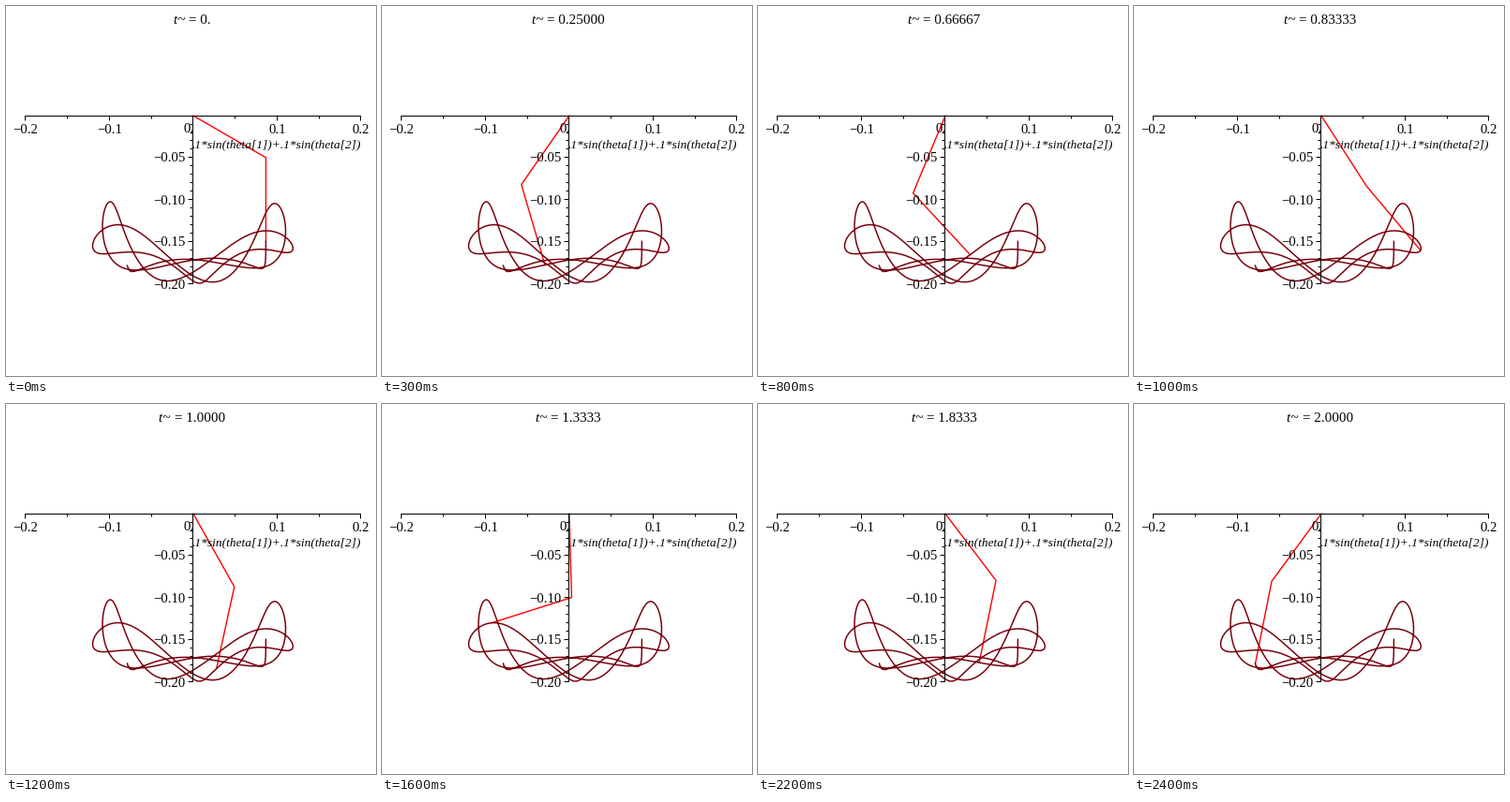
A matplotlib script for the animation above (2.5 s loop, 395 by 395 pixels).

```python
import numpy as np
import matplotlib.pyplot as plt
from matplotlib.animation import FuncAnimation

SIZE, DPI = 395, 79
PX = 72 / DPI                      # one pixel in points
X0, Y0, SCALE = 199.9, 117.1, 895  # pivot and pixels per metre
L, G = 0.1, 9.81
FRAMES, T_END, SUB = 25, 2.0, 100
LABEL_PX, TITLE_PX = 14.8, 15.1

plt.rcParams["font.family"] = "Liberation Serif"


def accel(s):
    """Double pendulum with equal masses and equal rods."""
    a1, a2, w1, w2 = s
    c, d = np.cos(a1 - a2), np.sin(a1 - a2)
    p = -2 * G / L * np.sin(a1) - d * w2**2
    q = -G / L * np.sin(a2) + d * w1**2
    b1 = (p - c * q) / (2 - c * c)
    return np.array([w1, w2, b1, q - c * b1])


def solve():
    h = T_END / ((FRAMES - 1) * SUB)
    s = np.array([np.pi / 3, 0.0, 0.0, 0.0])
    out = [s]
    for _ in range((FRAMES - 1) * SUB):
        k1 = accel(s)
        k2 = accel(s + h / 2 * k1)
        k3 = accel(s + h / 2 * k2)
        k4 = accel(s + h * k3)
        s = s + h / 6 * (k1 + 2 * k2 + 2 * k3 + k4)
        out.append(s)
    return np.array(out)


def to_px(x, y):
    return X0 + SCALE * x, Y0 - SCALE * y


def crisp(v):
    return np.floor(v) + 0.5


path = solve()
jx, jy = L * np.sin(path[:, 0]), -L * np.cos(path[:, 0])
tx, ty = jx + L * np.sin(path[:, 1]), jy - L * np.cos(path[:, 1])

fig = plt.figure(figsize=(SIZE / DPI, SIZE / DPI), dpi=DPI, facecolor="white")
ax = fig.add_axes([0, 0, 1, 1])
ax.set(xlim=(0, SIZE), ylim=(SIZE, 0))
ax.axis("off")


def line(xs, ys, color="black", width=1.0, z=3, **kw):
    return ax.plot(xs, ys, color=color, lw=width * PX, zorder=z, **kw)[0]


def label(x, y, s, size=LABEL_PX, **kw):
    return ax.text(x, y, s, fontsize=size * PX, va="baseline", zorder=5, **kw)


def draw_axes():
    ox, oy = crisp(X0), crisp(Y0)
    flat = dict(snap=False, solid_capstyle="butt")
    line([20, 379], [oy, oy], **flat)
    line([ox, ox], [117, 297], **flat)
    for i in range(-4, 5):
        x = crisp(X0 + SCALE * 0.05 * i)
        line([x, x], [oy, oy + (3 if i % 2 else 5)], **flat)
        if i % 2 == 0 and i:
            s = f"{0.05 * i:.1f}".replace("-", "\u2212")
            label(x + 0.5, 136, s, ha="center")
    label(195.3, 135, "0.", ha="center")
    for i in range(1, 21):
        y = crisp(Y0 + SCALE * 0.01 * i)
        line([ox - (3 if i % 5 else 5), ox], [y, y], **flat)
        if i % 5 == 0:
            label(191.5, y + 5, f"\u2212{0.01 * i:.2f}", ha="right")
    label(379.3, 151, ".1*sin(theta[1])+.1*sin(theta[2])", 13.35,
          ha="right", style="italic")


draw_axes()
rods = line([], [], "#ff0000", 1.4, 1, solid_joinstyle="round")
line(*to_px(tx, ty), "#78000e", 1.5, 2)
name = label(198, 19, "t~ ", TITLE_PX, ha="left", style="italic")
value = label(198, 19, "", TITLE_PX, ha="left")


def update(k):
    i = k * SUB
    rods.set_data(*to_px(np.array([0, jx[i], tx[i]]),
                         np.array([0, jy[i], ty[i]])))
    t = T_END * k / (FRAMES - 1)
    value.set_text("= " + (f"{t:#.5g}" if k else "0."))
    # centre the two-style caption as one line
    wn = 1.069 * TITLE_PX
    wv = value.get_window_extent().width * SIZE / fig.bbox.width
    left = 198.5 - (wn + wv) / 2
    name.set_x(left)
    value.set_x(left + wn)
    return rods, name, value


anim = FuncAnimation(fig, update, frames=FRAMES, interval=100,
                     repeat=True, repeat_delay=0, blit=False)
plt.show()
```
